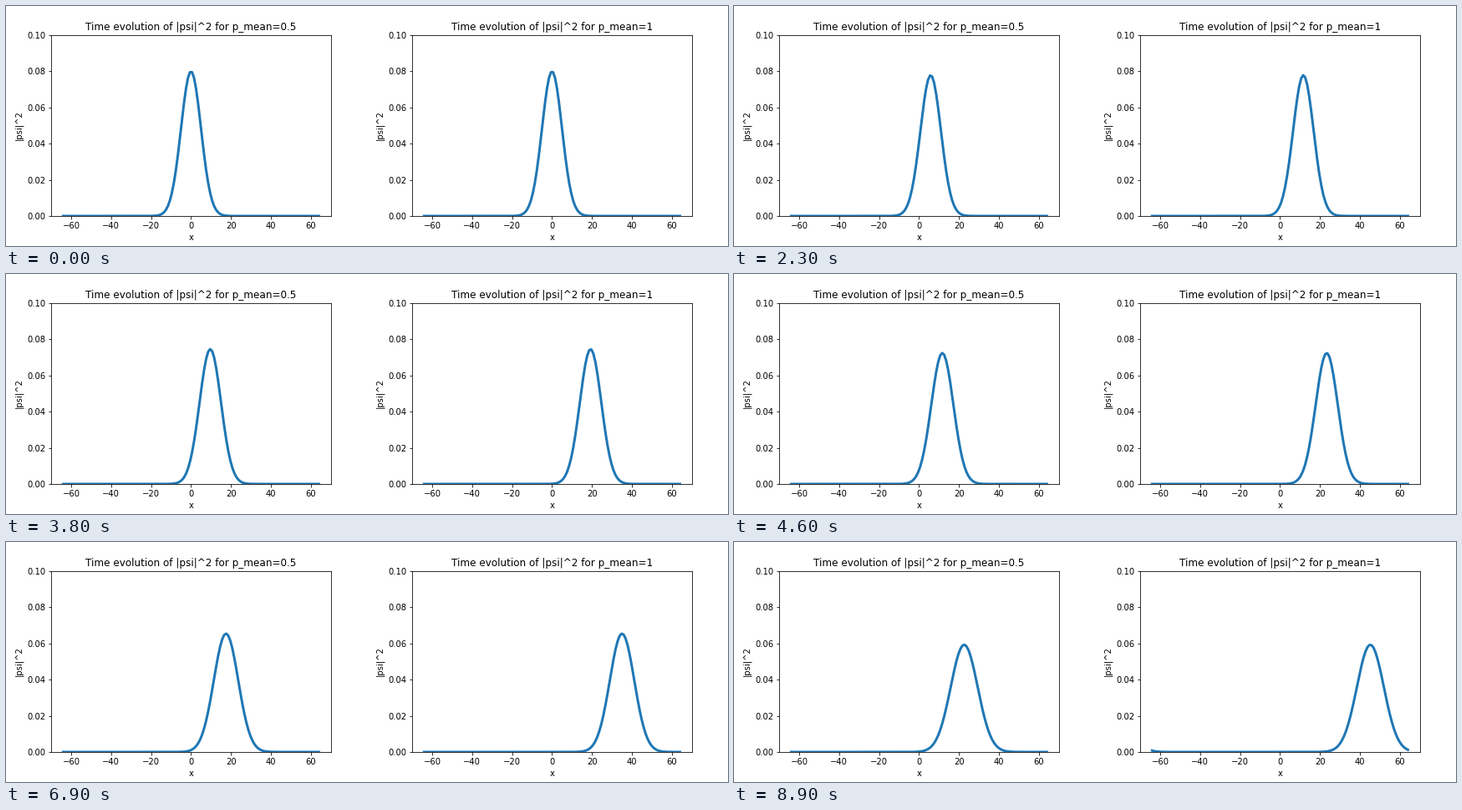
Recreate the animation shown at these times as a matplotlib script. Size 864 by 288 pixels, loop 9 s.

```python
import numpy as np
import matplotlib.pyplot as plt
from matplotlib.animation import FuncAnimation

FRAMES, INTERVAL = 90, 100
N, SIGMA, DT = 128, 5.0, 0.5

plt.rcParams["font.family"] = "DejaVu Sans"

x = np.linspace(-64, 64, N)
k = 2 * np.pi * np.fft.fftfreq(N)


def packet(p):
    """Gaussian wave packet with mean momentum p, in momentum space."""
    psi = (2 * np.pi * SIGMA**2) ** -0.25 * np.exp(-(x / (2 * SIGMA)) ** 2 + 1j * p * x)
    return np.fft.fft(psi)


def density(phi, t):
    """Free evolution on a periodic grid, as probability density."""
    return np.abs(np.fft.ifft(phi * np.exp(-0.5j * k**2 * t))) ** 2


def make_panel(fig, left, p):
    ax = fig.add_axes([left, 0.125, 0.3875, 0.755])
    ax.set(xlim=(-70, 70), ylim=(0, 0.1), xlabel="x", ylabel="|psi|^2",
           title=f"Time evolution of |psi|^2 for p_mean={p}")
    line, = ax.plot([], [], color="#1f77b4", lw=3)
    return line, packet(p)


fig = plt.figure(figsize=(12, 4), dpi=72, facecolor="white")
panels = [make_panel(fig, 0.0625, 0.5), make_panel(fig, 0.5625, 1)]


def update(i):
    for line, phi in panels:
        line.set_data(x, density(phi, i * DT))
    return [line for line, _ in panels]


anim = FuncAnimation(fig, update, frames=FRAMES, interval=INTERVAL,
                     repeat=True, repeat_delay=0, blit=False)
plt.show()
```
